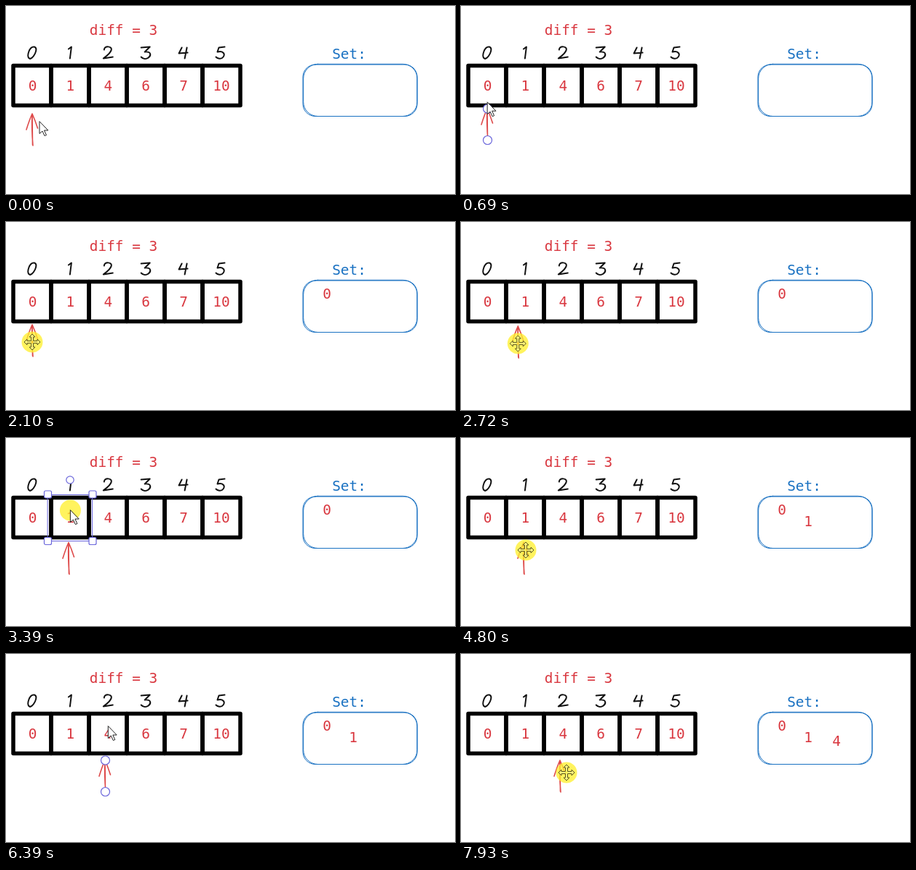
These frames come from a looping animation (617x260 px, 7.99 s). An HTML page with a canvas:

```html
<!DOCTYPE html>
<html lang="en">
<head>
<meta charset="utf-8">
<title>Two-pointer diff with a set</title>
<style>
html, body { margin: 0; width: 100%; height: 100%; overflow: hidden; background: #fff; }
canvas { display: block; width: 617px; height: 260px; }
</style>
</head>
<body>
<canvas id="stage" width="617" height="260"></canvas>
<script>
const ctx = document.getElementById('stage').getContext('2d');
const LOOP = 7990, START = 140, MARK_TIME = 130;
const RED = '#d93840', BLUE = '#1971c2', VIOLET = '#6965db';
const values = [0, 1, 4, 6, 7, 10];

// Each round: drag the arrow, pick a cell, copy its value, paste it into the set, return to the arrow
const rounds = [
  { grab: 140, drop: 280, leave: 550, click: 1000, pick: 1420, mark: 1420, paste: 1700, back: 2040,
    via: [40, 186], spot: [36, 166], put: [441, 99] },
  { grab: 2300, drop: 2860, leave: 3120, click: 3390, pick: 3390, mark: 3790, paste: 4350, back: 4800,
    via: [480, 87], spot: [89, 155], put: [477, 115] },
  { grab: 5000, drop: 5700, leave: 5970, click: 6590, pick: 6590, mark: 6990, paste: 7300, back: 7530,
    via: [139, 171], spot: [145, 164], put: [516, 120] }
];

// Handwritten numerals, centred on the origin
const numerals = [
  'M3 -8C-4 -9 -8 5 -4 8S10 -6 3 -8',
  'M-2 -5L2 -8 0 8',
  'M-5 -4C-4 -10 6 -9 5 -4S-2 5 -6 8L7 6',
  'M-6 -7L6 -8 -1 -1C8 -2 8 4 4 7S-4 8 -6 6',
  'M-2 -7L-6 1 6 0M5 -7L2 8',
  'M5 -8L-3 -7 -5 -1C3 -3 6 2 3 6S-5 8 -7 6'
].map(d => new Path2D(d));
const pointer = new Path2D('M0 0V16.500L4 13 7 19.500 9.500 18.500 6.500 12H11.500Z');
const crossArm = new Path2D('M-1.500 -2V-7H-4L0 -11 4 -7H1.500V-2');
const arrowLines = new Path2D('M0 0Q-1 20 1 44M0 1L.5 43M0 0Q-4 9 -8 22M0 0Q4 9 7.500 20');
const ibeam = new Path2D('M-3 -8Q0 -8 0 -6V6Q0 8 -3 8M3 -8Q0 -8 0 -6M0 6Q0 8 3 8');

const cellX = i => 36.5 + 51.9 * i;

function ease(t, from, to) {
  const p = Math.min(1, Math.max(0, (t - from) / (to - from)));
  return p * p * (3 - 2 * p);
}

const mix = (a, b, p) => a.map((v, i) => v + (b[i] - v) * p);

function stateAt(t) {
  let arrow = [36, 149], spot = [36, 152];
  let cursor = mix([46, 160], spot, ease(t, START / 2, START));
  let halo = t >= START, cross = halo, knobs = false;
  rounds.forEach((r, k) => {
    const moved = mix(arrow, [36 + 50 * k, 142 + 2.5 * k], ease(t, r.grab, r.drop));
    cursor = cursor.map((v, i) => v + moved[i] - arrow[i]);
    arrow = moved;
    cursor = mix(cursor, [cellX(k), 100], ease(t, r.leave, Math.min(r.click, r.leave + 420)));
    cursor = mix(cursor, r.via, ease(t, r.mark + MARK_TIME, r.paste));
    cursor = mix(cursor, r.spot, ease(t, r.back - 100, r.back));
    if (t >= r.drop) knobs = t < r.click;
    if (t >= r.leave) {
      halo = t >= r.click && t < r.mark || t >= r.paste;
      cross = t >= r.back;
    }
  });
  return { arrow, cursor, halo, cross, knobs };
}

function stroke(path, color, width) {
  ctx.strokeStyle = color;
  ctx.lineWidth = width;
  ctx.stroke(path);
}

function shape(path, fill, line, width = 1) {
  ctx.fillStyle = fill;
  ctx.fill(path);
  stroke(path, line, width);
}

function label(text, x, y, color) {
  ctx.fillStyle = color;
  ctx.fillText(text, x, y + 6.5);
}

function disc(x, y, r) {
  const p = new Path2D();
  p.arc(x, y, r, 0, 7);
  return p;
}

function roundBox(x, y, w, h, r) {
  const p = new Path2D();
  p.roundRect(x, y, w, h, r);
  return p;
}

function placed(x, y, draw) {
  ctx.save();
  ctx.translate(x, y);
  draw();
  ctx.restore();
}

function drawBoard(t) {
  values.forEach((v, i) => {
    stroke(roundBox(10 + 52 * i, 82.5, 52, 55, 0), '#000', 5.5);
    placed(cellX(i) - .5, 64.5, () => stroke(numerals[i], '#111', 2));
    label(v, cellX(i), 110, RED);
  });
  label('diff = 3', 161.5, 33, RED);
  label('Set:', 471.5, 66, BLUE);
  for (const d of [0, .7]) stroke(roundBox(408 + d, 81 - d, 157 - d, 71.5 + d, 17 + 4 * d), BLUE, 1);
  rounds.forEach((r, k) => { if (t >= r.paste) label(values[k], ...r.put, RED); });
}

function drawArrow({ arrow, knobs }) {
  placed(...arrow, () => {
    stroke(arrowLines, '#de4a4a', 1.6);
    if (knobs) for (const y of [0, 43.5]) shape(disc(.5, y, 6), '#fff', VIOLET, 1.2);
  });
}

function drawSelection(k, marked) {
  placed(52 * k, 0, () => {
    stroke(roundBox(5.5, 78.5, 61, 64, 0), VIOLET, 1);
    for (const x of [5.5, 67]) for (const y of [78, 142.5])
      shape(roundBox(x - 5, y - 5, 10, 10, 2), '#fff', VIOLET, 1.2);
    shape(disc(36, 58, 5.2), '#fff', VIOLET, 1.2);
    if (!marked) return;
    ctx.fillStyle = '#2b5cc4';
    ctx.fillRect(31, 98, 12, 24);
    label(values[k], 36.5, 110, '#fff');
    placed(38, 110, () => stroke(ibeam, '#fff', 1));
  });
}

function drawCursor({ cursor, halo, cross }, editing) {
  placed(...cursor, () => {
    if (halo) {
      ctx.fillStyle = 'rgba(255,240,45,.77)';
      ctx.fill(disc(0, 0, 14.5));
    }
    if (editing) return;
    if (!cross) return shape(pointer, '#fff', '#222');
    for (let i = 0; i < 4; i++) {
      shape(crossArm, '#fdf47c', '#5a5520');
      ctx.rotate(Math.PI / 2);
    }
  });
}

function frame(now) {
  const t = now % LOOP, state = stateAt(t);
  const k = rounds.findIndex(r => t >= r.pick && t < r.mark + MARK_TIME);
  const editing = k >= 0 && t >= rounds[k].mark;
  ctx.fillStyle = '#fff';
  ctx.fillRect(0, 0, 617, 260);
  drawBoard(t);
  drawArrow(state);
  if (k >= 0) drawSelection(k, editing);
  drawCursor(state, editing);
  requestAnimationFrame(frame);
}

ctx.font = '19.4px "DejaVu Sans Mono", monospace';
ctx.textAlign = 'center';
ctx.lineCap = ctx.lineJoin = 'round';
frame(0);
</script>
</body>
</html>
```
